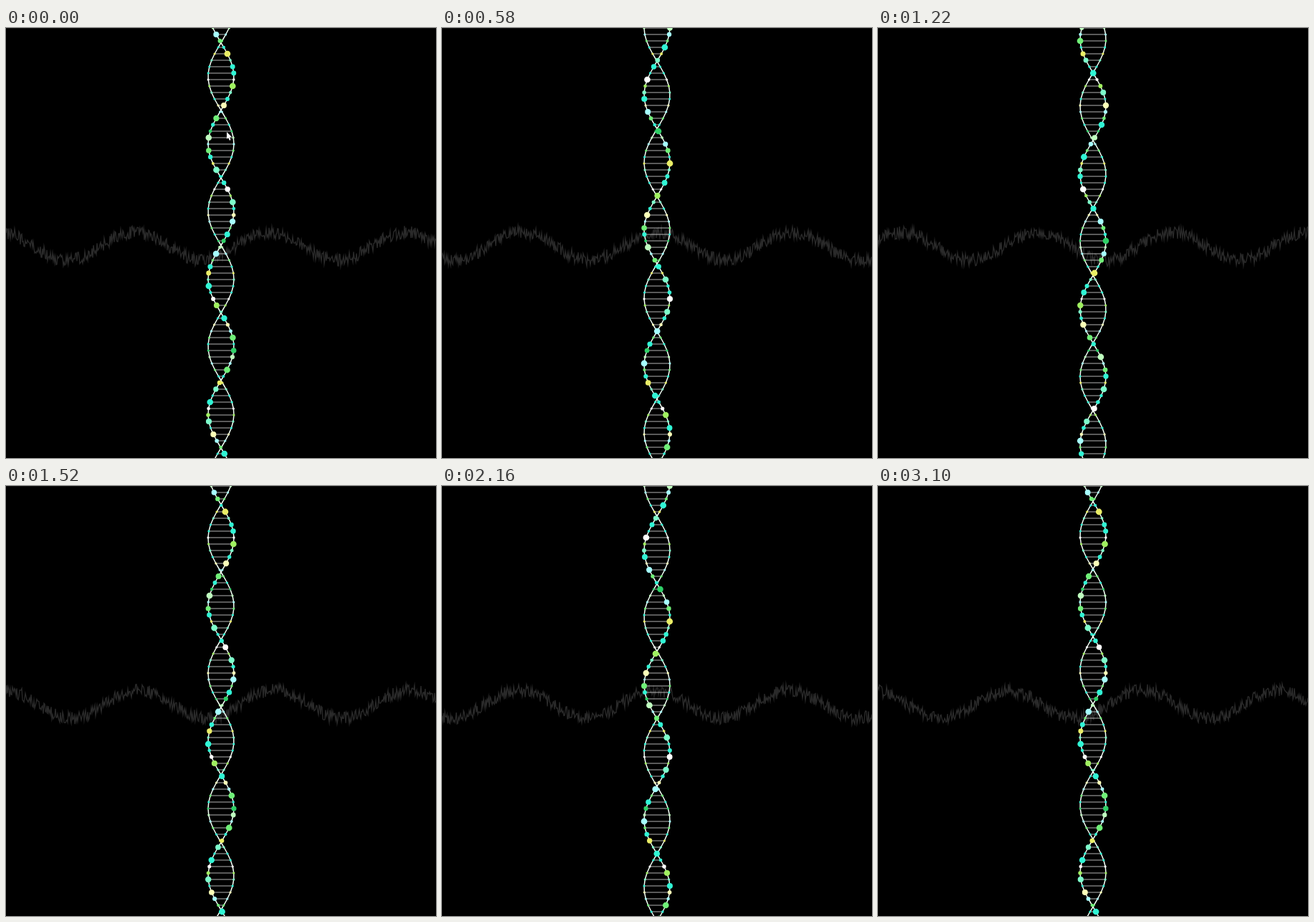
Animation of 600 by 600 pixels, one loop 3120 ms. Source, as an HTML page with a canvas:

```html
<!DOCTYPE html>
<html>
<head>
<meta charset="utf-8">
<style>
  html, body { margin: 0; width: 100%; height: 100%; overflow: hidden; background: #000; }
  canvas { display: block; }
</style>
</head>
<body>
<canvas id="stage" width="600" height="600"></canvas>
<script>
const ctx = document.getElementById('stage').getContext('2d');
const LOOP = 3120, TICK = 20, TURN = 0.08135, GAP = 9, ROWS = 67;
const mint = '#bfffbf', cyan = '#a6ffff', green = '#70f078', teal = '#30f5d5',
  yellow = '#eaee66', aqua = '#7dfccb', white = '#ffffff', lime = '#a0f060',
  cream = '#fbffb8', dark = '#2fd067';
// One colour per rung, repeating down the helix
const colours = [mint, cyan, green, teal, yellow, aqua, teal, teal, white,
  lime, aqua, teal, cream, cyan, green, teal, dark];

// Seeded noise in -1..1
function noise(x, step) {
  let h = Math.imul(x + 1, 374761393) ^ Math.imul(step + 1, 668265263);
  h = Math.imul(h ^ (h >>> 13), 1274126177);
  h = Math.imul(h ^ (h >>> 16), 2246822519);
  return ((h ^ (h >>> 15)) >>> 0) / 2147483648 - 1;
}

function line(count, point, colour, width) {
  ctx.beginPath();
  for (let i = 0; i <= count; i++) ctx.lineTo(...point(i));
  ctx.strokeStyle = colour;
  ctx.lineWidth = width;
  ctx.stroke();
}

function dot(x, y, r, colour) {
  ctx.fillStyle = colour;
  ctx.beginPath();
  ctx.arc(x, y, r, 0, 2 * Math.PI);
  ctx.fill();
}

function pointer(x, y) {
  ctx.fillStyle = '#fff';
  ctx.beginPath();
  for (const [dx, dy] of [[0, 0], [0, 10], [2, 8], [4, 12], [5.5, 11], [4, 7.5], [7, 7]])
    ctx.lineTo(x + dx, y + dy);
  ctx.fill();
}

function draw(step) {
  const phase = step * TURN;
  const swing = y => 18 * Math.sin(y / 30 - 0.683 + phase);

  ctx.fillStyle = '#000';
  ctx.fillRect(0, 0, 600, 600);
  ctx.fillStyle = '#111';
  ctx.fillRect(0, 0, 600, 1);

  line(600, x => [x, 304.5 - 19.5 * Math.cos(x / 30 - 6 + phase) + 9 * noise(x, step)], '#2a2a2a', 1.35);

  for (let n = 0; n <= ROWS; n++) {
    const y = n * GAP, s = swing(y);
    line(1, i => [300 + (i ? s : -s), y], '#b4b4b4', 1);
  }
  for (const side of [-1, 1])
    line(ROWS, n => [300 + side * swing(n * GAP), n * GAP], '#f4fff6', 1.5);

  for (let n = 0; n <= ROWS; n++) {
    const y = n * GAP, s = swing(y), colour = colours[n % colours.length];
    dot(300 - s, y, 1.6, colour);
    dot(300 + s, y, 3 + 1.4 * Math.cos(15 * n + 3.03 + phase), colour);
  }

  if (step === 0) pointer(308, 145);
}

function tick() {
  const t = performance.now() % LOOP;
  // The first pose is held for two ticks
  draw(Math.max(0, Math.floor(t / TICK) - 1));
  requestAnimationFrame(tick);
}
tick();
</script>
</body>
</html>
```
